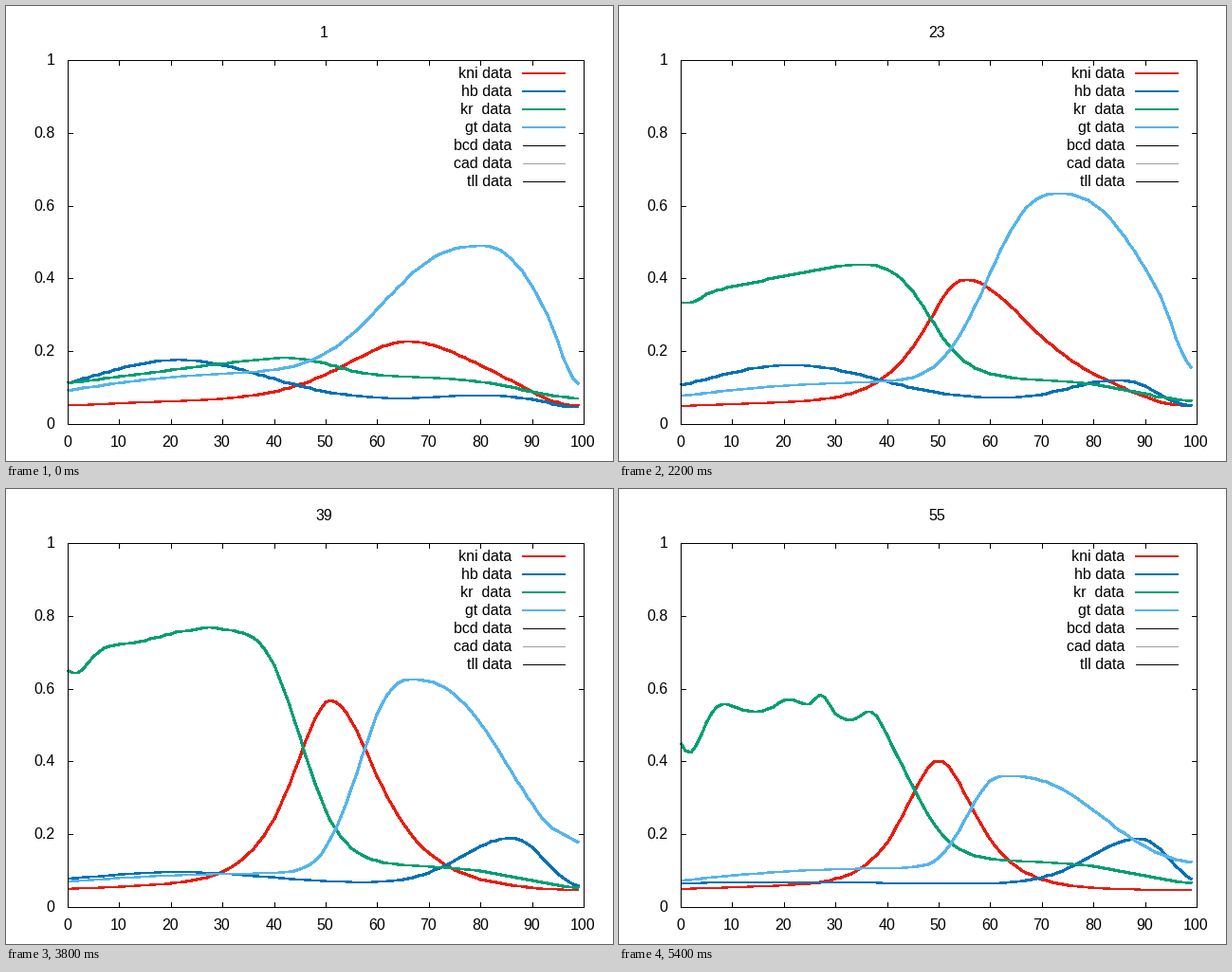
Recreate the animation shown at these times as a matplotlib script. Size 640 by 480 pixels, loop 5.5 s.

```python
import matplotlib.pyplot as plt
import numpy as np
from matplotlib.animation import FuncAnimation

W, H, DPI = 640, 480, 100
PX = 72 / DPI  # one pixel in points
LEFT, RIGHT, TOP, BOTTOM = 65, 609, 57, 441
BLACK, GRAY = "#000000", "#a0a0a0"

STEPS = 55
KEYS = np.array([1.0, 9, 23, 39, 55])
n = np.arange(1, STEPS + 1)
x = np.arange(100.0)


def track(*values):
    """A parameter eased smoothly through its values at the key steps."""
    v = np.array(values)
    slope = np.gradient(v, KEYS, edge_order=2)
    i = np.clip(np.searchsorted(KEYS, n, side="right") - 1, 0, len(KEYS) - 2)
    h = KEYS[i + 1] - KEYS[i]
    t = (n - KEYS[i]) / h
    out = ((1 + 2 * t) * (1 - t) ** 2 * v[i]
           + t * (1 - t) ** 2 * h * slope[i]
           + t * t * (3 - 2 * t) * v[i + 1]
           - t * t * (1 - t) * h * slope[i + 1])
    return out[:, None]


def rise(center, width):
    return 1 / (1 + np.exp((center - x) / width))


def fall(center, width):
    return 1 - rise(center, width)


def offset(center, left, right):
    """Distance from a center, in units of the width on that side."""
    return np.abs(x - center) / np.where(x < center, left, right)


def bell(center, left, right=None):
    return np.exp(-offset(center, left, right or left) ** 2 / 2)


def kni():
    u = offset(track(66, 59, 55, 51, 50),
               track(12, 9, 7.2, 6.7, 6),
               track(14, 17.5, 12.5, 8.2, 6.3))
    peak = track(.18, .25, .35, .52, .355) / np.cosh(u)
    return .047 + .008 * bell(18, 12) + peak * fall(92, 3)


def hb():
    front = track(.112, .122, .098, .032, .004) * bell(21.5, 16.5)
    back = (track(.015, .022, .057, .125, .125)
            * bell(track(81, 83, 85, 86, 89), 9.5, 6))
    return .064 * (1 - .3 * rise(94, 1.5)) + front + back


def kr():
    base = track(.06, .062, .053, .043, .056) + .07 * fall(88, 6)
    plateau = (track(-.018, .055, .225, .575, .395)
               + track(.0018, .0023, .0029, .003, .001) * x)
    dip = track(0, .005, .02, .05, .1) * bell(1.8, 2.2)
    bumps = (.03 * bell(8, 2.5) + .03 * bell(21, 2.2) + .042 * bell(27.3, 1.3)
             - .025 * bell(32.5, 2.5) + .035 * bell(37.2, 2))
    edge = fall(track(50, 48.7, 47.8, 45, 44.5), 3.8)
    return base + plateau * edge - dip + track(0, 0, 0, .15, 1) * bumps


def gt():
    base = (track(.092, .09, .077, .07, .072)
            + track(.055, .05, .042, .025, .038) * np.tanh(x / 25))
    u = offset(track(80, 80, 73, 66.5, 63),
               track(23, 23.5, 16.5, 12.4, 9.4),
               track(14.6, 16, 22.3, 23.2, 23))
    hump = track(.342, .452, .514, .53, .25) * np.exp(-u ** 2.5)
    drop = track(.09, .12, .085, -.03, 0) * rise(95.3, 1)
    return base + hump - drop


def px(value):
    return LEFT + value * (RIGHT - LEFT) / 100


def py(value):
    return BOTTOM - value * (BOTTOM - TOP)


plt.rcParams["font.family"] = "Liberation Sans"
fig = plt.figure(figsize=(W / DPI, H / DPI), dpi=DPI, facecolor="white")
ax = fig.add_axes([0, 0, 1, 1])
ax.set_xlim(0, W)
ax.set_ylim(H, 0)
ax.axis("off")


def thin(xs, ys, color=BLACK, zorder=1):
    ax.plot(xs, ys, color=color, lw=PX, zorder=zorder,
            solid_capstyle="projecting", solid_joinstyle="miter")


def thick(xs, ys, color):
    return ax.plot(xs, ys, color=color, lw=2 * PX, antialiased=False,
                   solid_capstyle="butt", solid_joinstyle="round")[0]


def label(at_x, baseline, text, align="center"):
    return ax.text(at_x, baseline, text, size=16 * PX, color=BLACK,
                   ha=align, va="baseline")


# Ticks on all four sides, with labels at the left and the bottom.
for v in range(0, 101, 10):
    tx = round(px(v) - 0.01)
    thin([tx, tx], [BOTTOM, BOTTOM - 5])
    thin([tx, tx], [TOP, TOP + 5])
    label(px(v) - 0.5, 465, str(v))
for v in range(0, 11, 2):
    ty = round(py(v / 10))
    thin([LEFT, LEFT + 5], [ty, ty])
    thin([RIGHT, RIGHT - 5], [ty, ty])
    label(51.5, ty + 5, f"{v / 10:g}", "right")

SERIES = [
    ("kni data", "#e51e10", kni),
    ("hb data", "#0072b2", hb),
    ("kr  data", "#009e73", kr),
    ("gt data", "#56b4e9", gt),
    ("bcd data", BLACK, None),
    ("cad data", GRAY, None),
    ("tll data", BLACK, None),
]

curves = []
for row, (name, color, profile) in enumerate(SERIES):
    y = 71 + 19 * row
    label(533, y + 5, name, "right")
    if profile:
        thick([544, 590], [y, y], color)
        curves.append((thick([], [], color), np.round(py(profile()))))
    else:
        thin([545, 589], [y, y], color)

thin([LEFT, RIGHT, RIGHT, LEFT, LEFT], [TOP, TOP, BOTTOM, BOTTOM, TOP],
     zorder=4)
title = label(335, 33, "1")
columns = np.round(px(x))


def draw(step):
    title.set_text(str(step + 1))
    for line, rows in curves:
        line.set_data(columns, rows[step])
    return [title] + [line for line, _ in curves]


anim = FuncAnimation(fig, draw, frames=STEPS, interval=100,
                     repeat=True, repeat_delay=0, blit=False)
plt.show()
```
